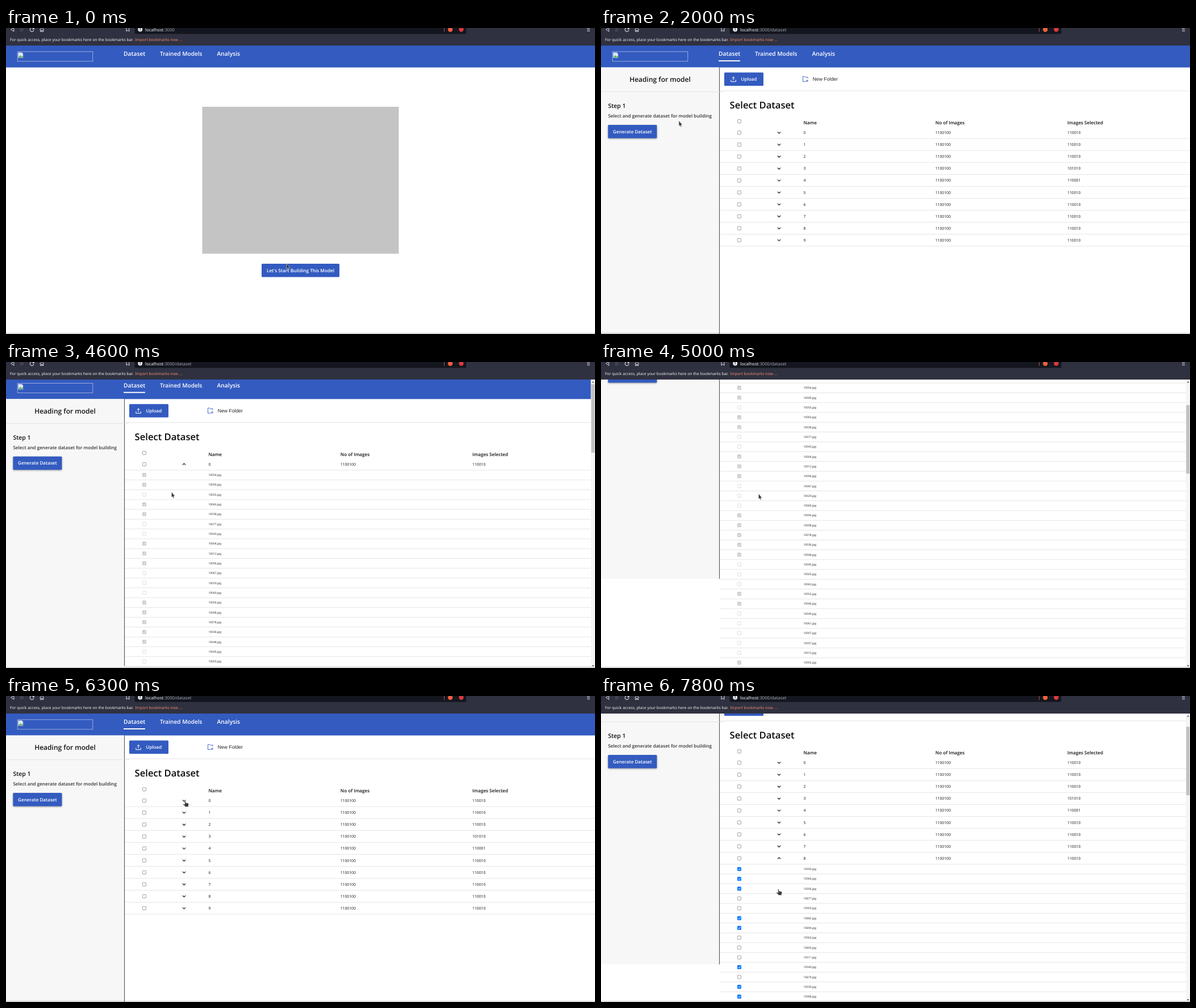
An HTML page for the animation above (8 s loop, 1037 by 540 pixels).

```html
<!DOCTYPE html>
<html lang="en">
<head>
<meta charset="utf-8">
<title>Dataset selection</title>
<style>
  html, body { margin: 0; width: 100%; height: 100%; overflow: hidden; background: #fff; }
  svg { display: block; font-family: "Open Sans", "Noto Sans", sans-serif; font-weight: 600; text-rendering: geometricPrecision; }
  .ui { font-family: "Noto Sans", sans-serif; font-weight: 400; }
  .plain { font-family: "Liberation Sans", Arial, sans-serif; font-weight: 400; }
  .cell { font-weight: 500; }
  .shadow { filter: drop-shadow(0 1.6px 1.6px rgba(0, 0, 0, .38)); }
</style>
</head>
<body>
<svg id="stage" width="1037" height="540" viewBox="0 0 1037 540"></svg>
<script>
const LOOP = 8000, STEP = 100, BLUE = '#335bc0';
const ROW = 21.1, SUB = 17.32, FIRST_ROW = 184.6;
const stage = document.getElementById('stage');

// Each move: start time, end time, then the place it ends at
const pointerMoves = [
  [200, 300, 494, 428], [800, 1200, 284, 245], [1400, 1900, 88, 180],
  [1900, 2300, 283, 113], [2300, 2600, 439, 174], [2700, 2900, 268, 189],
  [3000, 3300, 300, 185], [3400, 3700, 315, 184], [4000, 4400, 291, 229],
  [4600, 5000, 277, 232], [5500, 6100, 315, 184], [6300, 6600, 317, 246],
  [6800, 7100, 312, 351], [7600, 7800, 312, 340]
];
const scrollMoves = [[4500, 5000, 158], [5100, 5600, 0], [7700, 7800, 67]];

// Image names inside the two folders that get opened
const files = {
  0: '10054 10000 10055 10060 10038 10077 10043 10004 10012 10096 10067 10029 10069 10056 10098 10078 10036 10048 10045 10003 10063 10052 10046 10049 10061 10007 10057 10015 10002 10031',
  8: '15950 15960 15956 15877 15903 15882 15894 15963 15893 15911 15940 15879 15930 15968 15917'
};

const linear = k => k;
const scrollEase = (k, from, to) => to > from ? k ** 2.25 : 1 - (1 - k) ** 2.25;

function follow(moves, place, t, ease) {
  for (const [t0, t1, ...end] of moves) {
    if (t <= t0) break;
    const k = Math.min(1, (t - t0) / (t1 - t0));
    place = place.map((v, i) => v + (end[i] - v) * ease(k, v, end[i]));
  }
  return place;
}

const rect = (x, y, w, h, fill, more = '') =>
  `<rect x="${x}" y="${y}" width="${w}" height="${h}" fill="${fill}" ${more}/>`;
const circle = (x, y, r, fill) => `<circle cx="${x}" cy="${y}" r="${r}" fill="${fill}"/>`;
const text = (x, y, size, str, fill = '#111', more = '') =>
  `<text x="${x}" y="${y}" font-size="${size}" fill="${fill}" ${more}>${str}</text>`;
const path = (d, stroke, width = 1, more = '') =>
  `<path d="${d}" fill="none" stroke="${stroke}" stroke-width="${width}" ${more}/>`;
const rule = (x1, x2, y) => path(`M${x1} ${y}H${x2}`, '#dfdfdf', .8);
const middle = 'text-anchor="middle"';

function button(x, y, w, label, size, more = '') {
  return rect(x, y, w, 23.6, BLUE, `rx="1.5" ${more}`) +
    text(x + w / 2, y + 14.6, size, label, '#fff', middle);
}

function checkbox(y, on, disabled) {
  if (on) return rect(240, y - 3.4, 6.9, 6.9, disabled ? '#cbcbcb' : '#0075ff', 'rx="1.2"') +
    path(`M241.5 ${y + .1}l1.5 1.6l2.5-3.3`, '#fff');
  return rect(240.4, y - 3, 6.1, 6.1, '#fff',
    `rx="1.2" stroke="${disabled ? '#cfcfcf' : '#767676'}" stroke-width=".7"`);
}

function chevron(y, up) {
  const d = up ? -1.3 : 1.3;
  return path(`M310.9 ${y - d}l2.6 ${2 * d}l2.6 ${-2 * d}`, '#111', 1.1);
}

function navBar(active) {
  return rect(0, 31, 1037, 38.6, BLUE) +
    rect(20.2, 41.8, 132.6, 17, 'none', 'stroke="#b4bfdf" stroke-width=".8"') +
    path('M21.5 43.2h6.2l2.3 2.3v7h-8.5z', '#aab4cc', .6, 'style="fill:#dce8fb"') +
    path('M22 51.8l3-3.4l2.5 2.4l2-1.6v2.6z', '#4fa34f', .5, 'style="fill:#5cb35c"') +
    text(207, 49.4, 10.25, 'Dataset', '#fff') +
    text(271, 49.4, 10.1, 'Trained Models', '#fff') +
    text(371.5, 49.4, 10.3, 'Analysis', '#fff') +
    (active ? rect(207, 57, 38, 1.9, '#fff') : '');
}

function home() {
  return rect(345.5, 139, 346, 259.3, '#c4c4c4') +
    button(450, 416, 137, "Let's Start Building This Model", 8.2);
}

function sidebar() {
  return rect(0, 69.6, 208, 471, '#f7f7f7') +
    path('M208.5 69.6V540.6', '#4a4a4a') + rule(0, 217, 112.6) +
    text(104, 95.2, 12, 'Heading for model', '#111', middle) +
    text(12.4, 141.2, 10.5, 'Step 1') +
    text(12.4, 158.4, 8.1, 'Select and generate dataset for model building', '#333') +
    button(12.4, 171, 86, 'Generate Dataset', 8.1, 'class="shadow"');
}

function tableHead() {
  return button(217, 78.4, 69, '', 8) +
    path('M228.8 91.5v3.2h8.6v-3.2M233.1 92.5v-6M230.8 88.5l2.3-2.3l2.3 2.3', '#fff') +
    text(246.5, 93.2, 8, 'Upload', '#fff') +
    path('M364 89v-2.2h-4.4l-1.2-1.3h-2.9v9h5M362.8 91v4.4M360.6 93.2h4.4', BLUE, .9) +
    text(372.8, 93.1, 8.64, 'New Folder', '#222', 'class="plain"') +
    rule(209, 1037, 110.9) +
    text(226.6, 142.2, 16.6, 'Select Dataset', '#0a0a0a') +
    checkbox(164.6) +
    text(356.5, 170.4, 8.1, 'Name') +
    text(588.8, 170.4, 8.1, 'No of Images') +
    text(821, 170.4, 8.1, 'Images Selected');
}

function fileRow(y, name, disabled) {
  return checkbox(y, name % 2 === 0, disabled) +
    text(356.4, y + 1.8, 5, name + '.jpg', '#222', 'class="cell"') + rule(209, 1037, y + 8.8);
}

function table(open) {
  const selected = { 3: '101010', 4: '110001' };
  let out = tableHead();
  for (let r = 0; r < 10; r++) {
    const y = FIRST_ROW + r * ROW;
    const cell = (x, str) => text(x, y + 2.4, 6.8, str, '#111', 'class="cell"');
    out += checkbox(y) + chevron(y, r === open) + cell(356.4, r) +
      cell(588.7, '1100100') + cell(821, selected[r] || '110010') + rule(209, 1037, y + 10.5);
    // An open folder pushes all later rows out of view
    if (r === open) return out + files[r].split(' ')
      .map((name, i) => fileRow(y + 18.9 + i * SUB, name, r === 0)).join('');
  }
  return out;
}

function scrollBar(scroll) {
  return rect(1029.6, 31, 7.4, 509, '#f5f5f5') +
    rect(1030.4, 38.2 + .24 * scroll, 5.9, 120.8, '#c1c1c1') +
    '<path d="M1031.6 36.4h4l-2-2.4zM1031.6 535h4l-2 2.4z" fill="#505050"/>';
}

function browserBar(address) {
  const icon = '#dcdde3';
  return rect(0, 0, 1037, 31, '#303140') +
    rect(226.5, -12, 584, 22.4, '#14161f', 'rx="2.5"') +
    path('M13.8-.8v7l-5-3.5z', icon) + path('M26.2-.8v7l5-3.5z', '#5f606d') +
    path('M48.6 1.2a3.4 3.4 0 1 0 .4 2.4M49.2-1v2.6h-2.6', icon, 1.1) +
    path('M59.4 2.8l3.8-3.4l3.8 3.4M60.6 2.4v4h1.8v-2.4h1.6v2.4h1.8v-4', icon) +
    path('M212-2v8l2.4-2l2.4 2v-8', icon) +
    circle(236.2, 2.5, 3.9, '#e8e8ec') + path('M236.2-.2v3m0 .9v1', '#14161f') +
    text(245, 5.6, 7.67, `<tspan fill="#eee">localhost</tspan>:3000${address}`, '#9d9ea6', 'class="ui"') +
    path('M771.5-1V7', '#a5604f', .9) +
    circle(782.2, 2.8, 4.2, '#f0603c') + circle(801.5, 2.5, 4.2, '#d93a3c') +
    path('M1023 .4h5m-5 2.5h5m-5 2.5h5', icon, .9) +
    text(7, 23.4, 6.85, 'For quick access, place your bookmarks here on the bookmarks bar.', '#f0f0f2', 'class="ui"') +
    text(227.3, 23.4, 6.85, 'Import bookmarks now ...', '#f08a6c', 'class="ui"');
}

function pointer(t) {
  const [x, y] = follow(pointerMoves, [493.5, 415], t, linear);
  const within = (x0, y0, x1, y1) => x > x0 && x < x1 && y > y0 && y < y1;
  const hand = t < 900 ? within(450, 416, 587, 440)
    : within(12, 171, 98, 195) || within(296, 174, 326, 385);
  const d = hand
    ? 'M-.6 1.2Q.2 0 1 1.2L1.6 4.4L5.6 5.2Q6.8 5.6 6.6 7L6 9.4V11.4H.4L-.4 9.8L-3.2 7.6Q-3.8 6.6-2.6 6.4L0 7.2Z'
    : 'M.4.4V10L2.4 8.2L3.8 11.3L5.2 10.7L4 7.7H6.5Z';
  return `<path transform="translate(${x} ${y})" d="${d}" fill="#383838" stroke="#eee" stroke-width=".5"/>`;
}

function content(t, open) {
  if (t < 800) return home();
  if (t < 900) return sidebar() + text(208.8, 79, 8.64, 'loading....', '#222', 'class="plain"');
  return sidebar() + table(open);
}

function draw(t) {
  const started = t >= 800;
  const open = t >= 4000 && t < 6300 ? 0 : t >= 7600 ? 8 : -1;
  const [scroll] = follow(scrollMoves, [0], t, scrollEase);
  stage.innerHTML =
    '<defs><linearGradient id="fade" x2="0" y2="1"><stop stop-opacity="0"/><stop offset="1" stop-opacity=".22"/></linearGradient></defs>' +
    `<g transform="translate(0 ${-scroll})">${navBar(started)}${content(t, open)}</g>` +
    (open < 0 ? '' : scrollBar(scroll)) +
    rect(0, 537, 1037, 3, 'url(#fade)') +
    browserBar(started ? '/dataset' : '') + pointer(t);
}

const start = performance.now();
let shown = -1;
function tick() {
  const t = Math.floor((performance.now() - start) % LOOP / STEP) * STEP;
  if (t !== shown) draw(shown = t);
  requestAnimationFrame(tick);
}
tick();
</script>
</body>
</html>
```
